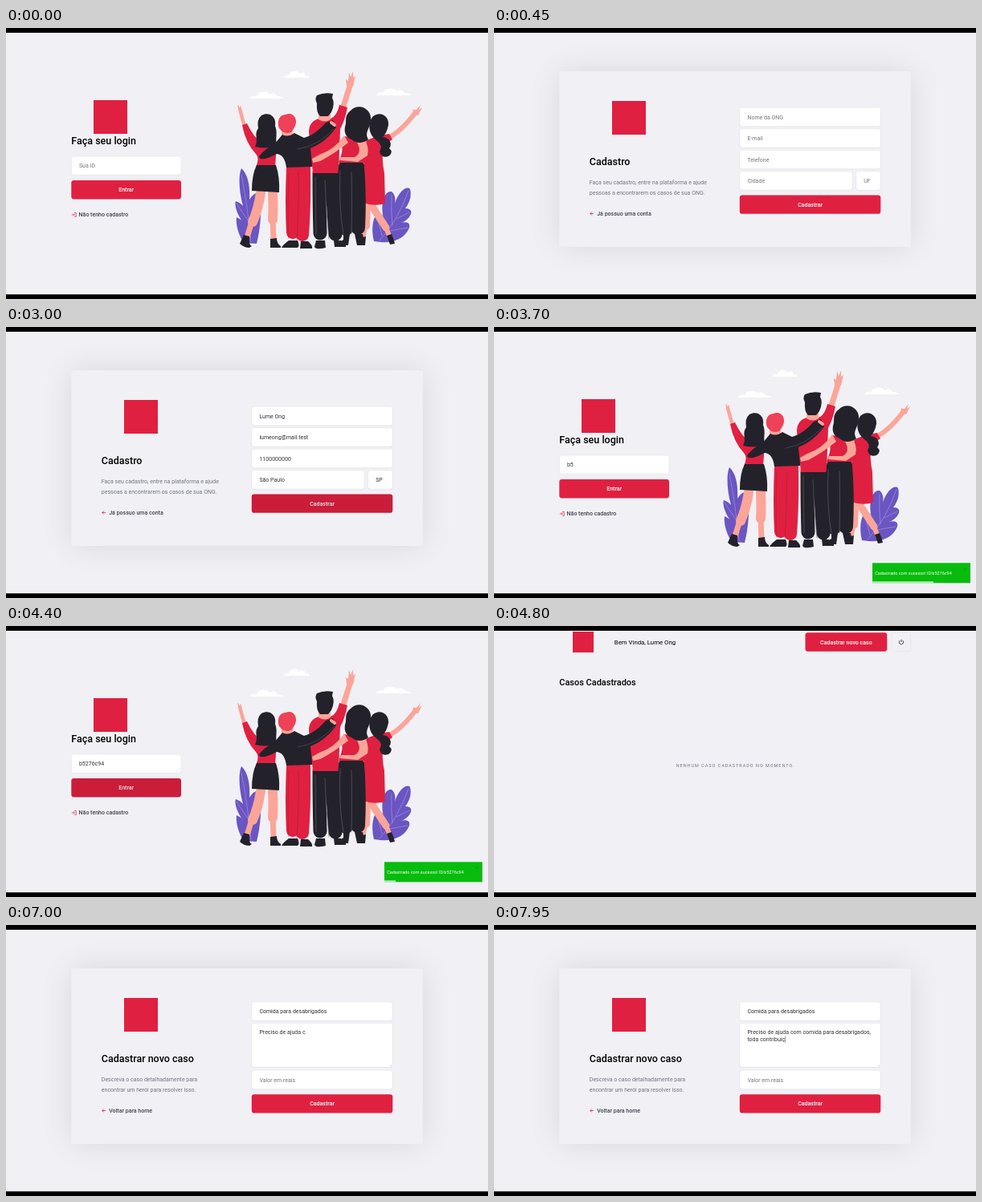
Write an HTML page that moves like this. It is 600 px wide and 338 px high and loops after 8 s.

```html
<!DOCTYPE html>
<html lang="pt-BR">
<head>
<meta charset="utf-8">
<title>Cadastro de ONG</title>
<style>
  html, body { margin: 0; width: 100%; height: 100%; overflow: hidden; background: #000; }
  svg { display: block; width: 100%; height: 100%; }
  text { font-family: Roboto, Arial, sans-serif; white-space: pre; }
  .people { stroke-linecap: round; stroke-linejoin: round; }
</style>
</head>
<body>
<svg id="stage" viewBox="0 0 600 338"></svg>
<script>
const LOOP = 8000;
const RED = '#e02041', INK = '#23222b', SKIN = '#fba598', PURPLE = '#6b55c2';
const PAPER = '#f0f0f5', GREY = '#737380', EDGE = '#dcdce6';
const BODY = 7.03, HEADING = 12.5;

const fields = [];
const buttons = [];

const rect = (x, y, w, h, fill, extra = '') =>
  `<rect x="${x}" y="${y}" width="${w}" height="${h}" fill="${fill}" ${extra}/>`;
const text = (x, y, str, { size = BODY, weight = 400, fill = '#000', extra = '' } = {}) =>
  `<text x="${x}" y="${y}" font-size="${size}" font-weight="${weight}" fill="${fill}" ${extra}>${str}</text>`;
const shape = (fill, d) => `<path fill="${fill}" d="${d}"/>`;
const line = (color, width, d) => `<path fill="none" stroke="${color}" stroke-width="${width}" d="${d}"/>`;
const mark = (x, y, size) => rect(x, y, size, size, RED);
const title = (x, y, str, size = HEADING) => text(x, y, str, { size, weight: 500 });
const link = (x, y, str) => text(x, y, str, { weight: 500, fill: '#41414d' });

// keys: [time, typed characters] pairs
function field(page, x, y, w, hint, value = '', keys = null, h = 23.4, baseline = 14.2) {
  const id = fields.length;
  fields.push({ id, page, value, keys, x: x + 9.6, y: y + baseline });
  const lines = value.split('\n').map((_, i) =>
    text(x + 9.6, y + baseline + i * 9.4, '', { fill: '#333', extra: `id="value${id}-${i}"` }));
  return rect(x, y + 0.6, w, h, '#d9d9e2', 'rx="3.1" opacity=".6"') +
    rect(x, y, w, h, '#fff', `rx="3.1" stroke="${EDGE}" stroke-width=".4"`) +
    text(x + 9.6, y + baseline, hint, { fill: '#757575', extra: `id="hint${id}"` }) + lines.join('');
}

function button(x, y, w, label, hoverFrom = Infinity) {
  buttons.push(hoverFrom);
  return `<g id="button${buttons.length - 1}">` + rect(x, y, w, 23.4, RED, 'rx="3.1"') +
    text(x + w / 2, y + 14.2, label, { weight: 500, fill: '#fff', extra: 'text-anchor="middle"' }) + '</g>';
}

const cloud = (x, y, w) => shape('#fff',
  `M${x} ${y}c1-4 5-4 ${w * .2}-3c1-6 ${w * .3}-8 ${w * .4}-2c4-3 8-1 ${w * .22} 2q${w * .17} 0 ${w * .18} 3z`);

function crowd() {
  const leaves =
    shape(PURPLE, 'M293 175C302 183 304 200 303 214Q310 203 315 207C319 225 317 249 312 269L296 268C288 256 286 243 287 236Q292 238 295 242C287 232 284 219 286 216Q292 218 295 222C290 204 289 184 293 175Z') +
    shape(PURPLE, 'M458 266C454 250 457 235 463 230Q469 231 470 238C465 216 472 203 480 204Q486 209 484 219C490 201 500 197 503 201Q506 213 497 225Q506 225 504 232Q500 241 491 243Q504 240 502 249C497 262 482 269 466 267Z') +
    line('#a99ce0', .6, 'M293 183Q301 223 305 267M315 213Q307 235 304 258M287 219L301 240M465 265Q487 242 501 203M480 209Q479 229 481 246M462 236L468 259M477 253L500 249M486 238L502 230');

  const leftWoman =
    line(SKIN, 4.5, 'M291 101L298 127') + line(SKIN, 1.4, 'M290 101L289 97M292 101L292 98') +
    line(SKIN, 12, 'M317 206Q314 226 307 242') + line(SKIN, 7, 'M308 235L300 261') +
    line(SKIN, 12, 'M332 206Q333 224 332 239') + line(SKIN, 7, 'M332 235L333 264') +
    shape(INK, 'M296 258L303 260Q302 271 306 272L303 274Q296 274 291 269Z') +
    shape(INK, 'M329 263L337 262Q337 269 342 272V274H329Z') +
    shape(RED, 'M294 121L300 119Q308 136 318 143L337 145L335 174H311Q316 162 311 157Q298 143 294 121Z') +
    shape(INK, 'M312 171H336Q341 186 340 205L306 203Q306 183 312 171Z') +
    shape(INK, 'M318 109C328 104 337 111 335 122C339 132 334 140 338 146Q327 152 310 148C315 139 308 133 314 125Q312 114 318 109Z');

  const redHairMan =
    line(RED, 16, 'M357 174Q355 219 357 255M371 174Q372 220 369 258') +
    line('#b91732', .7, 'M364 180Q365 223 362 264M352 180Q350 229 352 262') +
    shape(INK, 'M352 265H363Q366 272 363 274H343Q345 270 352 265ZM367 266H376Q382 271 381 275H366Z') +
    shape(SKIN, 'M343 121H357V137H343Z') +
    shape(INK, 'M344 133Q351 137 359 131L381 142V173L349 174Q347 158 337 157Q316 168 315 160Q322 151 334 145Z') +
    shape('#ee4258', 'M340 125C337 117 340 108 348 108Q356 105 360 112C363 119 359 125 355 130Q346 133 341 126Z');

  const tallMan =
    line(INK, 17, 'M390 181Q390 222 391 256M406 181Q407 223 410 257') +
    line('#686671', .6, 'M397 190Q398 226 402 263M385 186L386 257') +
    shape(INK, 'M386 265H397L398 274Q386 277 384 273ZM408 265H417Q424 270 423 273H409Z') +
    line(SKIN, 7, 'M419 101L429 69') +
    shape(SKIN, 'M424 73L423 64L426 66L427 55L429 61L432 54L432 62L435 60L432 73Z') +
    shape(RED, 'M389 113L404 113Q412 110 415 96L425 99Q422 115 416 126L414 181H382L377 130Q377 117 389 113Z') +
    shape(SKIN, 'M389 102H404V114Q397 119 389 114Z') +
    shape(INK, 'M387 84Q396 80 407 82L406 87Q410 94 405 105L401 110H391Q386 105 387 94Q384 88 387 84Z') +
    shape(INK, 'M361 138Q380 139 398 118L407 115L411 124Q395 147 369 153L357 151Z') +
    line(SKIN, 4, 'M405 118L409 121') + line('#65626d', .5, 'M363 151Q389 147 408 126');

  const rightWoman =
    line(SKIN, 9, 'M453 218Q463 234 473 249') + line(SKIN, 6, 'M472 247L478 261') +
    line(SKIN, 8, 'M450 218L449 247') + line(SKIN, 5, 'M449 243L445 261') +
    shape(INK, 'M474 259L480 257Q483 264 484 269L478 270ZM440 262L448 260L447 271H437Z') +
    line(SKIN, 6, 'M469 140Q489 133 510 105') +
    shape(SKIN, 'M506 108L507 101L510 103L516 96L514 102L518 99L513 109Z') +
    shape(RED, 'M449 140Q463 134 477 132L481 139L470 147Q467 162 471 181L472 219Q458 223 445 218L444 179Z') +
    shape(INK, 'M456 111C465 103 477 109 476 121Q474 131 469 136C479 137 481 146 477 150Q483 155 476 160Q467 163 465 154Q470 146 461 140C451 133 450 119 456 111Z');

  const centreWoman =
    line(INK, 18, 'M423 173Q420 207 423 250M437 173Q440 208 438 249') +
    line('#686671', .6, 'M430 180Q431 216 430 257M416 178Q414 224 420 257') +
    shape(INK, 'M420 257H428L426 271H414Q415 267 420 264ZM434 257H444L447 271H437Z') +
    shape(RED, 'M421 135Q437 138 449 134L447 168H414Q421 151 417 145Z') +
    shape(SKIN, 'M421 134L426 143Q407 158 391 166L382 168L381 163L390 158Q410 151 421 134Z') +
    shape(SKIN, 'M443 135Q453 146 450 159L438 167L416 165L417 161L434 161Q444 155 437 143Z') +
    shape(INK, 'M429 103C440 92 456 102 454 115C453 126 446 130 451 139Q440 147 430 139Q420 135 422 123C425 117 420 110 429 103Z');

  return '<g class="people">' + cloud(346, 62, 32) + cloud(304, 88, 41) + cloud(461, 84, 43) +
    leaves + leftWoman + redHairMan + tallMan + rightWoman + centreWoman + '</g>';
}

function card(heading, paragraph, back) {
  return rect(81.3, 54, 437.5, 219, '#000', 'opacity=".1" filter="url(#soft)"') +
    rect(81.3, 54, 437.5, 219, PAPER, 'rx="3.1"') + mark(147, 91, 42) + title(118.8, 171, heading) +
    paragraph.map((p, i) => text(118.8, 195.2 + i * 12.5, p, { fill: GREY })).join('') +
    line(RED, .8, 'M124 231.5H119.8M121.8 229.5L119.8 231.5L121.8 233.5') + link(128.2, 234, back);
}

const FORM = 305.8, FORM_W = 175.5;

const login = mark(109, 90, 42) + title(81.3, 145, 'Faça seu login') +
  field(0, 81.3, 160, 136.7, 'Sua ID', 'b5276c94', [[3640, 0], [3860, 8]]) +
  button(81.3, 190, 136.7, 'Entrar', 4150) +
  line(RED, .7, 'M85 230.5H87.3V235.3H85M81.8 232.9H85.3M83.9 231.4L85.4 232.9L83.9 234.4') +
  link(90.6, 235.4, 'Não tenho cadastro') + crowd();

const register = card('Cadastro',
    ['Faça seu cadastro, entre na plataforma e ajude', 'pessoas a encontrarem os casos de sua ONG.'],
    'Já possuo uma conta') +
  field(1, FORM, 99.3, FORM_W, 'Nome da ONG', 'Lume Ong', [[600, 0], [820, 8]]) +
  field(1, FORM, 125.8, FORM_W, 'E-mail', 'lumeong@mail.test', [[900, 0], [1360, 17]]) +
  field(1, FORM, 152.3, FORM_W, 'Telefone', '1100000000', [[1440, 0], [1690, 10]]) +
  field(1, FORM, 178.8, 140.4, 'Cidade', 'São Paulo', [[1800, 0], [2130, 9]]) +
  field(1, 450.6, 178.8, 30.7, 'UF', 'SP', [[2250, 0], [2380, 2]]) +
  button(FORM, 208.4, FORM_W, 'Cadastrar', 2680);

const home = mark(98, 7, 26) + text(149.8, 22.8, 'Bem Vinda, Lume Ong', { size: 7.8 }) +
  button(387.5, 8.3, 101.8, 'Cadastrar novo caso', 5250) +
  rect(495.3, 8.3, 23.4, 23.4, 'none', `rx="1.5" stroke="${EDGE}" stroke-width=".4"`) +
  line('#222', .8, 'M505.1 18.2A2.7 2.7 0 1 0 508.9 18.2M507 16.8V20') +
  title(81.3, 74.2, 'Casos Cadastrados', 10.94) +
  text(300.5, 176, 'NENHUM CASO CADASTRADO NO MOMENTO.',
    { size: 5.47, fill: GREY, extra: 'text-anchor="middle" letter-spacing="1"' });

const newCase = card('Cadastrar novo caso',
    ['Descreva o caso detalhadamente para', 'encontrar um herói para resolver isso.'],
    'Voltar para home') +
  field(3, FORM, 96, FORM_W, 'Título do caso', 'Comida para desabrigados', [[5690, 0], [6360, 24]]) +
  field(3, FORM, 122.5, FORM_W, 'Descrição',
    'Preciso de ajuda com comida para desabrigados,\ntoda contribuiç',
    [[6500, 0], [7650, 43], [7950, 62]], 54.7, 13.4) +
  line('#999', .3, 'M477.5 176L480 173.5M479 176L480 175') +
  field(3, FORM, 181.3, FORM_W, 'Valor em reais') +
  button(FORM, 211.2, FORM_W, 'Cadastrar');

const toast = `<g id="toast">` + rect(471, 294.3, 122, 25, '#07bc0c') +
  text(474.2, 308.6, 'Cadastrado com sucesso! ID:b5276c94', { size: 5.47, fill: '#fff' }) +
  line('#087f0b', .6, 'M585 300.5L587.5 303M587.5 300.5L585 303') +
  rect(471, 317.3, 122, 2, '#fff', 'id="progress" opacity=".7"') + '</g>';

const stage = document.getElementById('stage');
stage.innerHTML =
  '<defs><filter id="soft" x="-20%" y="-40%" width="140%" height="180%"><feGaussianBlur stdDeviation="19.5"/></filter>' +
  '<clipPath id="view"><rect y="5.7" width="600" height="326.8"/></clipPath></defs>' +
  rect(0, 0, 600, 338, '#000') + '<g clip-path="url(#view)">' + rect(0, 5.7, 600, 326.8, PAPER) +
  [login, register, home, newCase].map((content, i) => `<g id="page${i}">${content}</g>`).join('') +
  toast + rect(0, 0, .5, 8, '#333', 'id="caret"') + '</g>';

const el = id => document.getElementById(id);
const show = (id, on) => { el(id).style.display = on ? '' : 'none'; };
const clamp = v => Math.min(1, Math.max(0, v));

const cuts = [[0, 0], [350, 1], [3180, 0], [4450, 2], [5500, 3]];
const typing = fields.filter(f => f.keys).sort((a, b) => a.keys[0][0] - b.keys[0][0]);
const TOAST_IN = 3180, TOAST_OUT = 4560;

function typedCount(keys, t) {
  let count = 0;
  for (let i = 1; i < keys.length; i++) {
    const [t0, n0] = keys[i - 1], [t1, n1] = keys[i];
    if (t >= t0) count = n0 + (n1 - n0) * clamp((t - t0) / (t1 - t0));
  }
  return Math.floor(count + 1e-6);
}

function render(t) {
  const page = cuts.filter(([start]) => start <= t).pop()[1];
  for (let i = 0; i < 4; i++) show('page' + i, i === page);

  for (const f of typing) {
    const shown = f.value.slice(0, typedCount(f.keys, t));
    const lines = shown.split('\n');
    f.value.split('\n').forEach((_, i) => { el(`value${f.id}-${i}`).textContent = lines[i] || ''; });
    show('hint' + f.id, !shown);
    f.lastLine = lines.length - 1;
  }

  const active = typing.filter(f => f.keys[0][0] - 60 <= t).pop();
  const caretOn = active && active.page === page && t % 340 < 170;
  show('caret', caretOn);
  if (caretOn) {
    const width = el(`value${active.id}-${active.lastLine}`).getComputedTextLength();
    el('caret').setAttribute('x', active.x + width);
    el('caret').setAttribute('y', active.y - 6.5 + active.lastLine * 9.4);
  }

  buttons.forEach((from, i) => {
    el('button' + i).style.filter = `brightness(${1 - 0.1 * clamp((t - from) / 80)})`;
  });

  show('toast', t >= TOAST_IN && t < TOAST_OUT + 120);
  el('toast').setAttribute('opacity', clamp((t - TOAST_IN) / 100) * clamp((TOAST_OUT + 120 - t) / 120));
  el('progress').setAttribute('width', 122 * clamp((TOAST_OUT - t) / (TOAST_OUT - TOAST_IN)));
}

function frame() {
  render(performance.now() % LOOP);
  requestAnimationFrame(frame);
}
frame();
</script>
</body>
</html>
```
